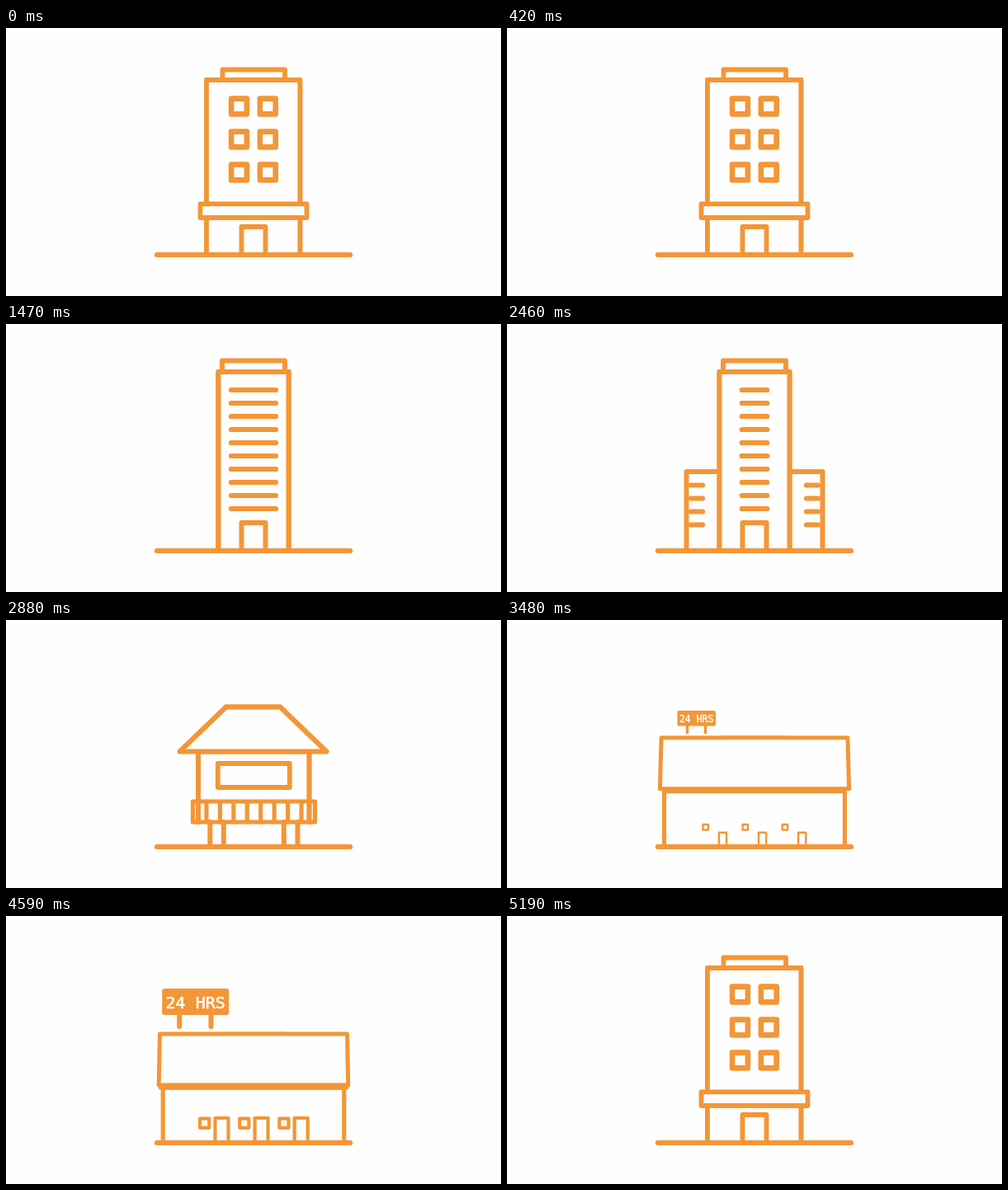
An HTML page with a canvas that plays this animation: 600 by 325 pixels, repeating every 5490 ms.

```html
<!DOCTYPE html>
<html lang="en">
<head>
<meta charset="utf-8">
<title>Buildings</title>
<style>
html, body { margin: 0; width: 100%; height: 100%; overflow: hidden; background: #fefefe; }
canvas { display: block; }
</style>
</head>
<body>
<canvas id="stage" width="600" height="325"></canvas>
<script>
const ctx = document.getElementById('stage').getContext('2d');
const ORANGE = '#f39637', WHITE = '#fefefe';
const LOOP = 5490, STEP = 30, MORPH = 330, GROUND = 275;

// Each block: centre x, half width at top, half width at bottom, top, bottom.
// rows: half width, first y, spacing.
const DOOR = [300, 14.5, 14.5, 241, GROUND];
const NO_DOOR = [300, 14, 14, GROUND, GROUND];
const TOWER = [300, 42.5, 42.5, 58, GROUND];
const TOWER_CAP = [300, 38, 38, 44.5, 58];

const buildings = [
  { // block of flats
    line: [5.8], main: [299.7, 56.7, 56.7, 63, GROUND], wing: [299.7, 56.7, 56.7, 63, GROUND],
    cap: [300.3, 37.8, 37.8, 50.5, 63], roof: [300, 64.5, 64.5, 213.3, 230],
    door: DOOR, rows: [0, 150, 8],
    details(p) {
      for (const y of [95, 135, 175])
        for (const x of [282.5, 317.3]) box(x, y, 9.4, 9.4, 6.6, p);
    }
  },
  { // cottage
    line: [6], main: [300.2, 72.8, 72.8, 204, 249], wing: [300.2, 72.8, 72.8, 204, 249],
    cap: [259.3, 11, 11, 143, 156.5], roof: [300, 62, 82.5, 156.5, 204],
    door: DOOR, rows: [0, 215, 2],
    details(p) {
      for (const x of [258.7, 340.7])
        at(x, 209, p, () => path([[-11.5, 16], [-11.5, -8], [0, -16.5], [11.5, -8], [11.5, 16]], 5.8, true, true));
      for (const x of [233.2, 367]) railing(x, 262.5, 31, 12.5, 5, 5.5, p);
    }
  },
  { // tower
    line: [6], main: TOWER, wing: TOWER, cap: TOWER_CAP, roof: TOWER,
    door: DOOR, rows: [27, 80, 16], details() {}
  },
  { // tower with wings
    line: [6], main: TOWER, wing: [300, 82.5, 82.5, 179, GROUND], cap: TOWER_CAP, roof: TOWER,
    door: DOOR, rows: [15.3, 80, 16],
    details(p) {
      for (let i = 0; i < 4; i++)
        for (const x of [230, 370]) bar(x, 195.5 + i * 16, 7, 6.2, p);
    }
  },
  { // stilt hut
    line: [6], main: [300.2, 67.2, 67.2, 159.5, 245], wing: [300.2, 67.2, 67.2, 159.5, 245],
    cap: [299.5, 32.8, 32.8, 105.5, 105.5], roof: [299.5, 32.8, 89, 105.5, 159.5],
    door: NO_DOOR, rows: [0, 180, 2],
    details(p) {
      box(300.3, 188.5, 43.5, 14.5, 5.8, p);
      railing(300.5, 232.5, 74, 12.5, 9, 5.2, p);
      for (const x of [247.3, 263.8, 336.8, 353.5])
        at(x, GROUND, p, () => path([[0, -30], [0, 0]], 6));
    }
  },
  { // shop
    line: [5], main: [300, 109.7, 109.7, 208, GROUND], wing: [300, 109.7, 109.7, 208, GROUND],
    cap: [300, 37, 37, 143, 143], roof: [300, 113.5, 114.8, 143, 205],
    door: NO_DOOR, rows: [0, 180, 2],
    details(p) {
      bar(300, 207.5, 112, 6.5, p);
      for (let i = 0; i < 3; i++) {
        const x = 240.7 + i * 48.1;
        box(x, 251.2, 5.6, 5.6, 4.2, p);
        at(x + 20.8, GROUND, p, () => path([[-8, 0], [-8, -30], [8, -30], [8, 0]], 4.2));
      }
      at(229.7, 140, p, sign);
    }
  }
];
const starts = [480, 1110, 1830, 2520, 3360, 4650];

function path(points, width, closed, filled) {
  ctx.beginPath();
  points.forEach(([x, y]) => ctx.lineTo(x, y));
  if (closed) ctx.closePath();
  if (filled) { ctx.fillStyle = WHITE; ctx.fill(); }
  ctx.lineWidth = width;
  ctx.stroke();
}

function at(x, y, scale, draw) {
  if (scale <= 0) return;
  ctx.save();
  ctx.translate(x, y);
  ctx.scale(scale, scale);
  draw();
  ctx.restore();
}

function box(x, y, w, h, line, p) {
  at(x, y, p, () => path([[-w, -h], [w, -h], [w, h], [-w, h]], line, true, true));
}

function bar(x, y, half, line, p) {
  at(x, y, p, () => path([[-half, 0], [half, 0]], line));
}

function railing(x, y, w, h, gaps, line, p) {
  at(x, y, p, () => {
    path([[-w, -h], [w, -h], [w, h], [-w, h]], line, true);
    for (let i = 1; i < gaps; i++) {
      const post = -w + 2 * w * i / gaps;
      path([[post, -h], [post, h]], line);
    }
  });
}

function sign() {
  for (const x of [-19.5, 18.8]) path([[x, -22], [x, -6]], 6);
  ctx.fillStyle = ORANGE;
  ctx.beginPath();
  ctx.roundRect(-40.5, -52, 81, 32, 3);
  ctx.fill();
  ctx.fillStyle = ctx.strokeStyle = WHITE;
  ctx.font = '20px "DejaVu Sans Mono", monospace';
  ctx.textAlign = 'center';
  ctx.lineWidth = 0.6;
  ctx.fillText('24 HRS', 0, -28.5);
  ctx.strokeText('24 HRS', 0, -28.5);
}

function block([x, top, bottom, y0, y1], line, closed) {
  y0 = Math.min(y0, GROUND);
  y1 = Math.min(y1, GROUND);
  path([[x - bottom, y1], [x - top, y0], [x + top, y0], [x + bottom, y1]], line, closed, true);
}

const clamp = v => Math.max(0, Math.min(1, v));
const backOut = v => 1 + 2.70158 * (v - 1) ** 3 + 1.70158 * (v - 1) ** 2;

function render(time) {
  let k = -1;
  starts.forEach((s, i) => { if (time >= s) k = i; });
  const from = buildings[Math.max(k, 0)];
  const to = buildings[(k + 1) % buildings.length];
  const u = k < 0 ? 1 : clamp((time - starts[k]) / MORPH);
  const e = backOut(u);
  const mix = key => from[key].map((v, i) => v + (to[key][i] - v) * e);

  ctx.fillStyle = WHITE;
  ctx.fillRect(0, 0, 600, 325);
  ctx.strokeStyle = ORANGE;
  ctx.lineCap = ctx.lineJoin = 'round';

  const [line] = mix('line');
  block(mix('wing'), line);
  block(mix('cap'), line, true);
  block(mix('main'), line);
  block(mix('roof'), line, true);

  const [half, first, gap] = mix('rows');
  if (half > 0.3)
    for (let i = 0; i < 10; i++) bar(300, first + gap * i, half, Math.min(6.2, half), 1);

  if (u < 1) from.details(1 - clamp(u / 0.35));
  to.details(backOut(clamp((u - 0.25) / 0.75)));
  block(mix('door'), line);
  path([[182.7, GROUND], [417.3, GROUND]], 5.8);
}

const begin = performance.now();
function tick() {
  const time = Math.max(0, performance.now() - begin) % LOOP;
  render(Math.floor(time / STEP) * STEP);
  requestAnimationFrame(tick);
}
tick();
</script>
</body>
</html>
```
